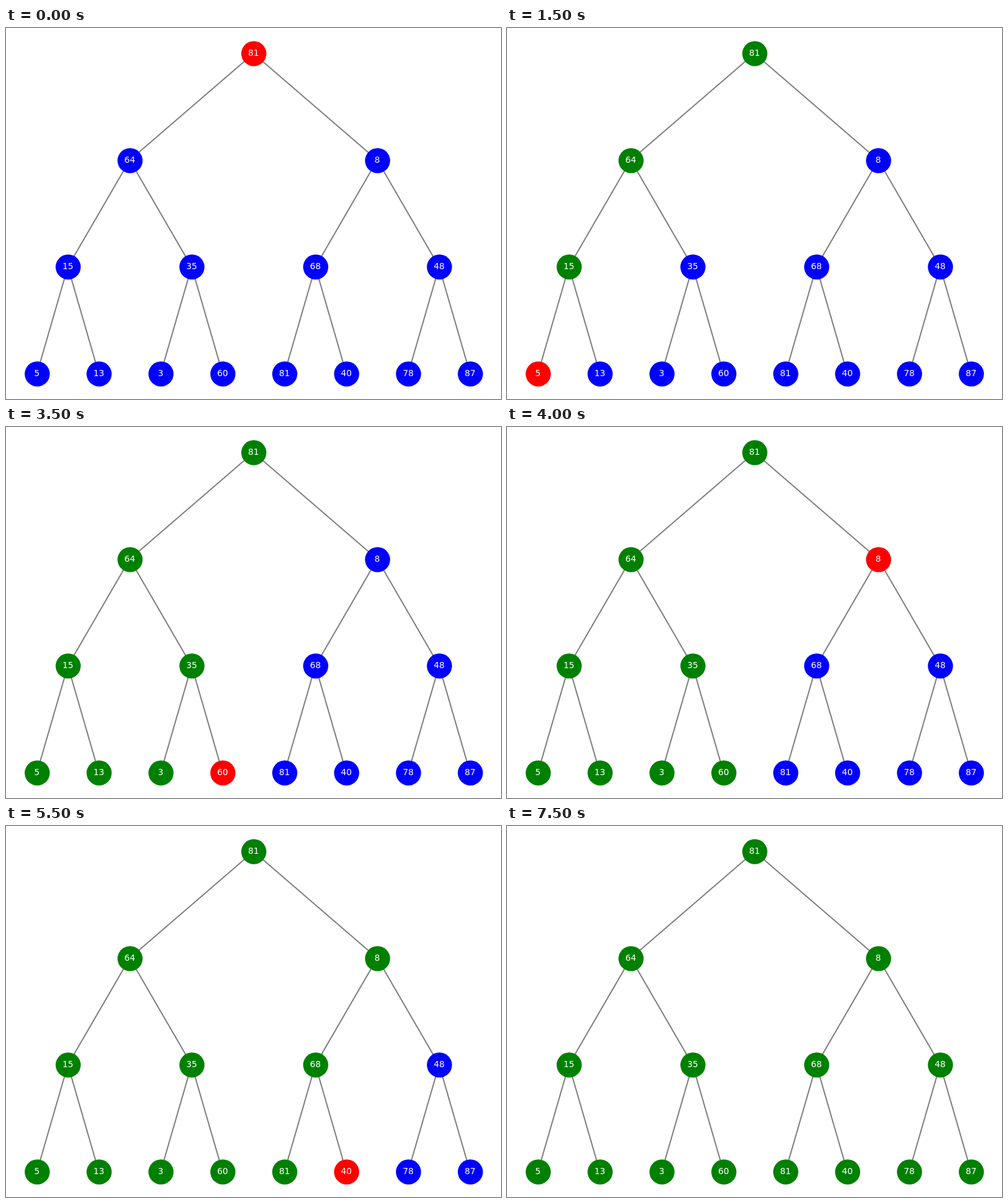
Write an HTML page with a canvas that moves like this. It is 800 px wide and 600 px high and loops after 8 s.

```html
<!DOCTYPE html>
<html lang="en">
<head>
<meta charset="utf-8">
<title>Depth-first traversal</title>
<style>
  html, body { margin: 0; width: 100%; height: 100%; overflow: hidden; background: #fff; }
  canvas { display: block; }
</style>
</head>
<body>
<canvas id="stage" width="800" height="600"></canvas>
<script>
const ctx = document.getElementById('stage').getContext('2d');
const STEP = 500;
const RADIUS = 20.3;

// Values in pre-order, which is also the visiting order.
const values = [81, 64, 15, 5, 13, 35, 3, 60, 8, 68, 81, 40, 48, 78, 87];
const nodes = [];

function build(x, depth, parent) {
  const node = { x, y: 41.25 + depth * 172.5, parent, label: String(values[nodes.length]) };
  nodes.push(node);
  if (depth === 3) return;
  const dx = 200 / 2 ** depth;
  build(x - dx, depth + 1, node);
  build(x + dx, depth + 1, node);
}
build(400, 0, null);

function drawEdge({ x, y, parent }) {
  if (!parent) return;
  ctx.beginPath();
  ctx.moveTo(parent.x, parent.y);
  ctx.lineTo(x, y);
  ctx.stroke();
}

function drawNode({ x, y, label }, color) {
  ctx.fillStyle = color;
  ctx.beginPath();
  ctx.arc(x + 0.5, Math.floor(y + 0.5) + 0.5, RADIUS, 0, Math.PI * 2);
  ctx.fill();
  ctx.fillStyle = '#fff';
  ctx.fillText(label, x, Math.round(y + 4));
}

function draw(step) {
  ctx.fillStyle = '#fff';
  ctx.fillRect(0, 0, 800, 600);
  ctx.strokeStyle = '#808080';
  ctx.lineWidth = 2.08;
  ctx.font = '13.89px "DejaVu Sans", sans-serif';
  ctx.textAlign = 'center';
  ctx.textBaseline = 'alphabetic';
  nodes.forEach(drawEdge);
  nodes.forEach((node, i) => {
    drawNode(node, i < step ? '#008000' : i === step ? '#ff0000' : '#0000ff');
  });
}

const start = performance.now();
function tick() {
  const elapsed = performance.now() - start;
  draw(Math.floor(elapsed / STEP) % (nodes.length + 1));
  requestAnimationFrame(tick);
}
tick();
</script>
</body>
</html>
```
